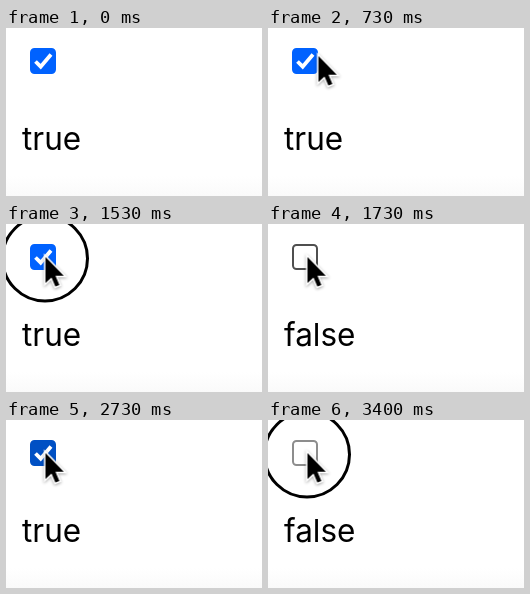
Write an HTML page that moves like this. It is 256 px wide and 168 px high and loops after 3470 ms.

```html
<!DOCTYPE html>
<html lang="en">
<head>
<meta charset="utf-8">
<title>Checkbox toggle</title>
<style>
  html, body { margin: 0; width: 100%; height: 100%; overflow: hidden; background: #fff; }
  svg { display: block; width: 100vw; height: 100vh; }
  text { font: 31.5px Inter, Roboto, sans-serif; fill: #000; }

  .box, .on, .off, .ring, .cursor { animation: 3470ms step-end infinite; }
  .box { animation-name: shade; stroke-width: 2; }
  .on { animation-name: checked; }
  .off { animation-name: unchecked; }
  .ring { animation-name: press; }
  .cursor { animation-name: move; filter: drop-shadow(0 1.5px 1.5px rgba(0, 0, 0, .35)); }

  @keyframes shade {
    0%, 100% { fill: #0062ff; stroke: #0062ff; }
    46.1% { fill: #3a84ff; stroke: #3a84ff; }
    48.12% { fill: #fff; stroke: #4f4f4f; }
    67.14% { fill: #fff; stroke: #8d8d8d; }
    69.16% { fill: #0050c4; stroke: #0050c4; }
    84.43% { fill: #3a84ff; stroke: #3a84ff; }
    86.45% { fill: #fff; stroke: #4f4f4f; }
    97.98% { fill: #fff; stroke: #8d8d8d; }
  }
  @keyframes checked {
    0%, 69.16%, 100% { opacity: 1; }
    48.12%, 86.45% { opacity: 0; }
  }
  @keyframes unchecked {
    0%, 69.16%, 100% { opacity: 0; }
    48.12%, 86.45% { opacity: 1; }
  }
  @keyframes press {
    0%, 30.83%, 49.85%, 71.18%, 88.47%, 100% { opacity: 0; }
    26.8%, 44.09%, 65.41%, 84.43%, 97.98% { opacity: 1; }
  }
  @keyframes move {
    0%, 100% { transform: translate(270px, 180px); }
    2.01% { transform: translate(236px, 146px); }
    3.74% { transform: translate(198px, 104px); }
    5.76% { transform: translate(160px, 64px); }
    7.78% { transform: translate(126px, 35px); }
    9.5% { transform: translate(104px, 20px); }
    11.52% { transform: translate(92.5px, 15px); }
    15.27% { transform: translate(78px, 17px); }
    17.29% { transform: translate(69px, 20px); }
    19.3% { transform: translate(59px, 24px); }
    21.03% { transform: translate(50.5px, 28px); }
    23.05% { transform: translate(43.5px, 31px); }
    25.07% { transform: translate(39.5px, 33px); }
  }
</style>
</head>
<body>
<svg viewBox="0 0 256 168">
  <defs>
    <linearGradient id="fade" x2="0" y2="1">
      <stop stop-color="#fff"/>
      <stop offset="1" stop-color="#fafafa"/>
    </linearGradient>
  </defs>
  <rect width="256" height="168" fill="#fff"/>
  <rect y="148" width="256" height="20" fill="url(#fade)"/>

  <rect class="box" x="25" y="21" width="24" height="24" rx="3.5"/>
  <path class="on" d="M29.5 33.5 34.7 38.7 45 26.5" fill="none" stroke="#fff" stroke-width="3.8"/>
  <text class="on" x="16" y="122">true</text>
  <text class="off" x="16" y="122">false</text>

  <circle class="ring" cx="39" cy="34.5" r="42.5" fill="none" stroke="#000" stroke-width="3"/>
  <path class="cursor" d="M0 0V26L6 20.4 9.9 29.5 13.9 27.9 10 18.8H18.3Z"
        stroke="#fff" stroke-width="3" paint-order="stroke"/>
</svg>
</body>
</html>
```
